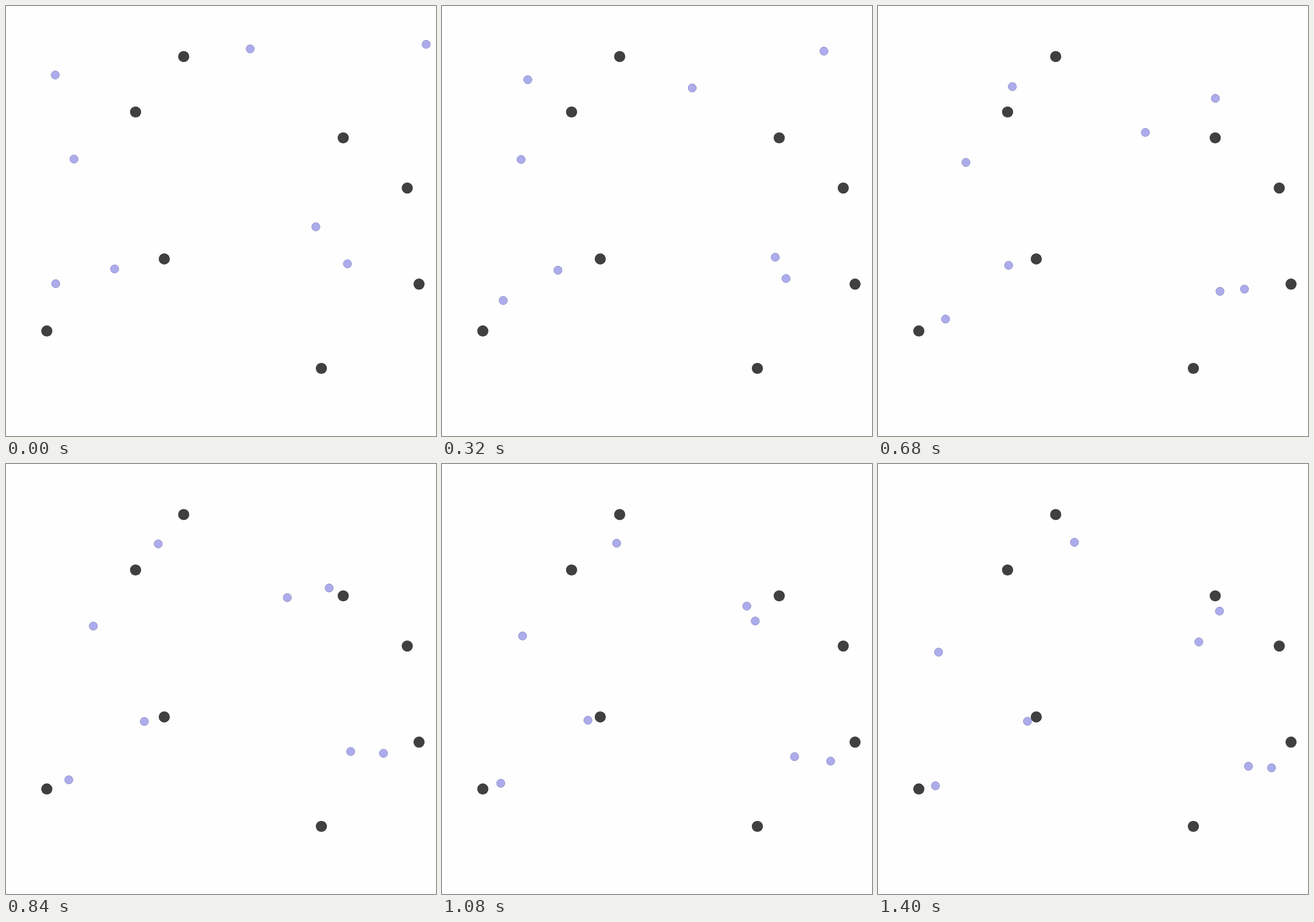
An HTML page with a canvas that plays this animation: 748 by 748 pixels, repeating every 1.44 s.

```html
<!DOCTYPE html>
<html lang="en">
<head>
<meta charset="utf-8">
<title>Drifting particles</title>
<style>
html, body { margin: 0; width: 100%; height: 100%; overflow: hidden; background: #fefefe; }
canvas { display: block; }
</style>
</head>
<body>
<canvas id="stage" width="748" height="748"></canvas>
<script>
const ctx = document.getElementById('stage').getContext('2d');
const LOOP = 1440, STEP = 40;

const anchors = [
  [309.1, 87.9], [225.4, 184.4], [586.6, 229.4], [698, 316.6],
  [275.3, 440], [718.5, 483.8], [71, 565.3], [548.6, 630.4],
];

// Each particle glides through a few key points at these times
const times = [0, 320, 520, 960, 1400];
const paths = [
  [[85.7, 120], [149.2, 128.2], [198.6, 137.9], [285.5, 138.1], [341.7, 136.2]],
  [[118.2, 266.2], [137.6, 267], [149.1, 266.5], [147.6, 290.3], [105.4, 327.3]],
  [[424.8, 74.6], [435.3, 142.6], [447.1, 195.2], [509.3, 240], [594, 255.9]],
  [[730.9, 66.7], [664.4, 78.5], [618.2, 114.1], [550.3, 249.2], [558.1, 309.5]],
  [[539, 384.1], [579.7, 437], [614.2, 474.1], [667.8, 510.1], [684.6, 528.5]],
  [[594, 448.5], [598.4, 474], [594.1, 489.5], [605.4, 503.8], [644.4, 525.8]],
  [[86.5, 483], [106.5, 512.3], [119, 534.6], [104.4, 552.3], [100, 559.8]],
  [[189, 457.4], [201.7, 459.6], [214.5, 454.8], [248.5, 446.4], [260, 447.6]],
];

// Tangent at key point i of the parabola through its nearest three points
function tangent(path, i, axis) {
  const m = Math.min(Math.max(i, 1), times.length - 2);
  const before = times[m] - times[m - 1], after = times[m + 1] - times[m];
  const v0 = (path[m][axis] - path[m - 1][axis]) / before;
  const v1 = (path[m + 1][axis] - path[m][axis]) / after;
  const bend = (v1 - v0) / (before + after);
  return v0 + bend * (2 * times[i] - times[m] - times[m - 1]);
}

// Cubic Hermite curve between neighbouring key points
function position(path, t, axis) {
  let i = 0;
  while (i < times.length - 2 && t >= times[i + 1]) i++;
  const span = times[i + 1] - times[i], u = (t - times[i]) / span, w = 1 - u;
  return w * w * (1 + 2 * u) * path[i][axis] + u * u * (3 - 2 * u) * path[i + 1][axis]
    + span * u * w * (w * tangent(path, i, axis) - u * tangent(path, i + 1, axis));
}

function disc(x, y, radius, fill, stroke) {
  ctx.beginPath();
  ctx.arc(x, y, radius, 0, 2 * Math.PI);
  ctx.fillStyle = fill;
  ctx.fill();
  if (stroke) {
    ctx.strokeStyle = stroke;
    ctx.stroke();
  }
}

function draw() {
  const t = Math.floor(performance.now() % LOOP / STEP) * STEP;
  ctx.fillStyle = '#fefefe';
  ctx.fillRect(0, 0, 748, 748);
  for (const [x, y] of anchors) disc(x, y, 9.7, '#404040');
  for (const path of paths) {
    disc(position(path, t, 0), position(path, t, 1), 7.2, '#acacec', '#9494c8');
  }
  requestAnimationFrame(draw);
}
draw();
</script>
</body>
</html>
```
